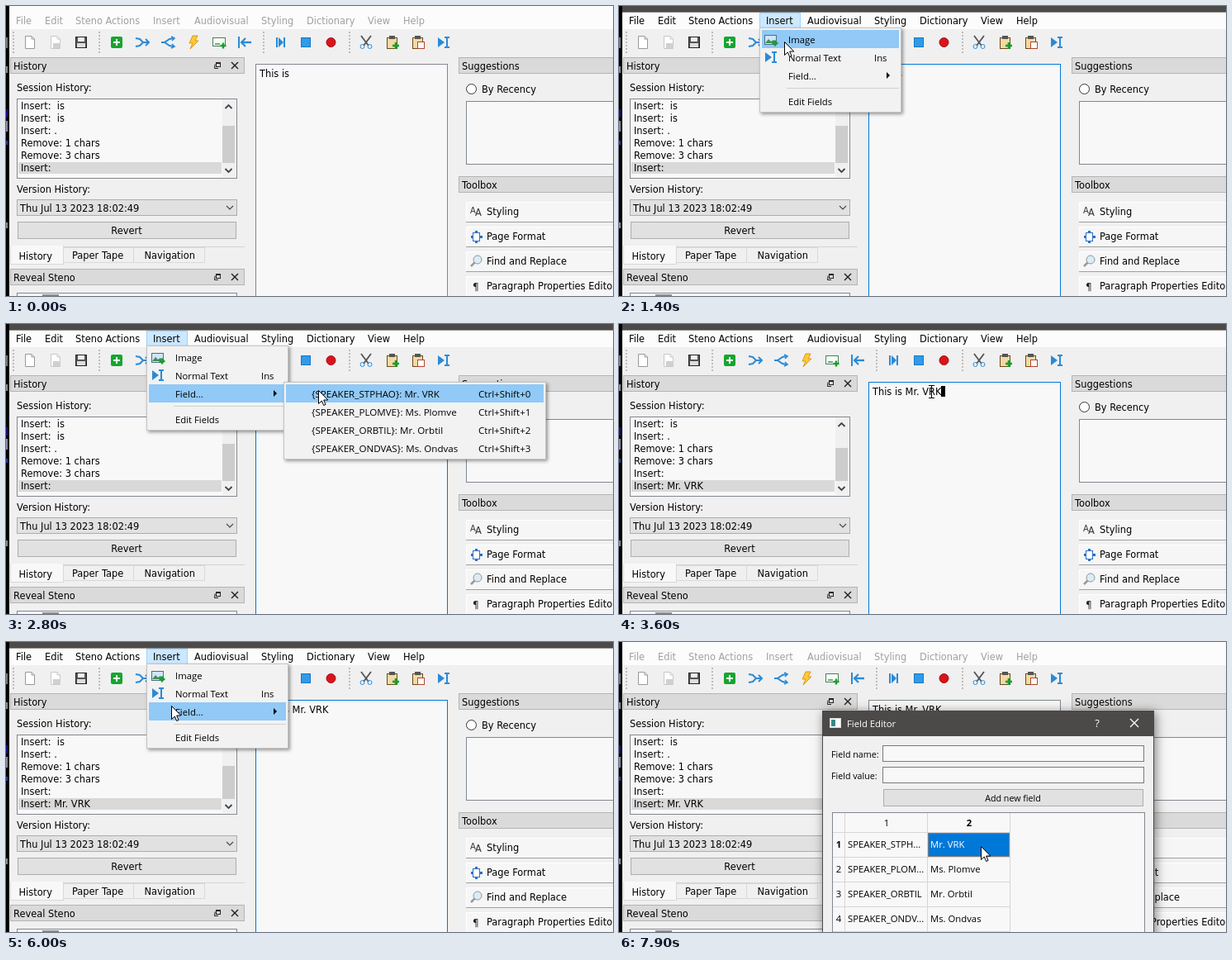
Write an HTML page with a canvas that moves like this. It is 735 by 351 pixels and loops after 8000 ms.

```html
<!DOCTYPE html>
<html lang="en">
<head>
<meta charset="utf-8">
<title>Field editor demo</title>
<style>
html, body { margin: 0; width: 100%; height: 100%; overflow: hidden; background: #f0f0f0; }
canvas { display: block; }
</style>
</head>
<body>
<canvas id="stage" width="735" height="351"></canvas>
<script>
const g = document.getElementById('stage').getContext('2d');
const LOOP = 8000;
const MAIN = '11.4px "DejaVu Sans", sans-serif';
const UI = '11.3px "Open Sans", sans-serif';
const SUB = '11.6px "Open Sans", sans-serif';
const LABEL = '10.7px "Open Sans", sans-serif';
const BLUE = '#0078d7', ICON = '#2b8ad6', PAPER = '#f8f8f8', FACE = '#f0f0f0', HOT = '#91c9f7';

const SPEAKERS = [
  ['STPHAO', 'Mr. VRK'], ['PLOMVE', 'Ms. Plomve'],
  ['ORBTIL', 'Mr. Orbtil'], ['ONDVAS', 'Ms. Ondvas']
];
const MENUS = [['File', 12], ['Edit', 47], ['Steno Actions', 84], ['Insert', 178], ['Audiovisual', 228],
  ['Styling', 309], ['Dictionary', 364], ['View', 438], ['Help', 481], ['', 514]];
const HISTORY = ['Insert:  is', 'Insert:  is', 'Insert: .', 'Remove: 1 chars', 'Remove: 3 chars',
  'Insert: ', 'Insert: ' + SPEAKERS[0][1]];
const ROW = 22;
const ITEMS = [['Image', 29], ['Normal Text', 51], ['Field...', 73], ['Edit Fields', 104]];

// Pointer path: time, x, y
const PATH = [[200, 140, 44], [500, 152, 21], [800, 192, 21], [1300, 192, 21], [1400, 200, 43],
  [1900, 293, 77], [2200, 293, 77], [2800, 378, 80], [3500, 378, 80], [3600, 378, 82],
  [3900, 378, 82], [4000, 408, 64], [4600, 183, 20], [5700, 183, 20], [6200, 212, 115],
  [6600, 212, 115], [7200, 441, 254], [7500, 441, 254], [7600, 438, 247], [LOOP, 438, 247]];

function pointerAt(t) {
  const i = Math.max(1, PATH.findIndex(p => p[0] > t));
  const [a, b] = [PATH[i - 1], PATH[i]];
  const k = Math.max(0, (t - a[0]) / (b[0] - a[0]));
  return [Math.round(a[1] + (b[1] - a[1]) * k), Math.round(a[2] + (b[2] - a[2]) * k)];
}

function rect(x, y, w, h, fill) {
  g.fillStyle = fill;
  g.fillRect(x, y, w, h);
}

function box(x, y, w, h, fill, edge) {
  rect(x, y, w, h, edge);
  rect(x + 1, y + 1, w - 2, h - 2, fill);
}

function text(s, x, y, font = MAIN, color = '#000', align = 'left') {
  g.font = font;
  g.fillStyle = color;
  g.textAlign = align;
  g.fillText(s, x, y);
}

function line(points, color, width = 1) {
  g.strokeStyle = color;
  g.lineWidth = width;
  g.beginPath();
  points.forEach(([x, y]) => g.lineTo(x, y));
  g.stroke();
}

function poly(points, fill, edge) {
  g.beginPath();
  points.forEach(([x, y]) => g.lineTo(x, y));
  g.closePath();
  g.fillStyle = fill;
  g.fill();
  if (edge) {
    g.strokeStyle = edge;
    g.lineWidth = 1;
    g.stroke();
  }
}

function disc(x, y, r, fill, edge) {
  g.beginPath();
  g.arc(x, y, r, 0, 7);
  if (fill) { g.fillStyle = fill; g.fill(); }
  if (edge) { g.strokeStyle = edge; g.lineWidth = 1; g.stroke(); }
}

function at(x, y, draw) {
  g.save();
  g.translate(x, y);
  draw();
  g.restore();
}

function shadowed(draw, blur, offset, alpha) {
  g.save();
  g.shadowColor = `rgba(0,0,0,${alpha})`;
  g.shadowBlur = blur;
  g.shadowOffsetX = g.shadowOffsetY = offset;
  draw();
  g.restore();
}

function plus(x, y, r, color, w) {
  line([[x - r, y], [x + r, y]], color, w);
  line([[x, y - r], [x, y + r]], color, w);
}

function page(edge) {
  poly([[-5.5, -7.5], [2, -7.5], [5.5, -4], [5.5, 7.5], [-5.5, 7.5]], '#fff', edge);
  line([[2, -7], [2, -4], [5, -4]], edge);
}

function clipboard() {
  box(-7, -6, 13, 14, '#f3d9a4', '#6b4a1e');
  rect(-4, -8, 7, 4, '#555');
}

function picture() {
  box(-8, -6, 15, 12, '#cfe6f5', '#4a6f86');
  poly([[-7, 4], [-3, -1], [0, 2], [3, 0], [6, 4]], '#3f8f5a');
  plus(5, 4, 3.5, '#16a02c', 2.4);
}

function textMark() {
  poly([[-7, -6], [1, 0], [-7, 6]], ICON);
  rect(3, -6, 2, 12, ICON);
  rect(1, -7, 6, 2, ICON);
  rect(1, 5, 6, 2, ICON);
}

const TOOLS = [
  [29, () => page('#999')],
  [60, () => { page('#c8c8c8'); rect(-3, 1, 9, 6, '#d0d0d0'); }],
  [91, () => {
    box(-7, -7, 14, 14, '#555', '#222');
    rect(-4, -6, 8, 5, '#eee');
    rect(-5, 1, 10, 5, '#ddd');
  }],
  [134, () => {
    g.fillStyle = '#17a52f';
    g.beginPath();
    g.roundRect(-7, -7, 14, 14, 2);
    g.fill();
    plus(0, 0, 4, '#fff', 2);
  }],
  [165, () => {
    line([[-8, -5], [-3, -4], [1, 0], [-3, 4], [-8, 5]], ICON, 2);
    line([[0, 0], [7, 0]], ICON, 2);
    line([[4, -4], [8, 0], [4, 4]], ICON, 2);
  }],
  [196, () => {
    line([[7, -5], [2, -4], [-4, 0], [2, 4], [7, 5]], ICON, 2);
    line([[-8, 0], [-3, 0]], ICON, 2);
    line([[4, -7], [8, -5], [5, -2]], ICON, 1.6);
    line([[4, 7], [8, 5], [5, 2]], ICON, 1.6);
  }],
  [227, () => poly([[-1, -8], [5, -8], [2, -2], [6, -2], [-4, 8], [-1, 1], [-5, 1]], '#ffc93c', '#d99a12')],
  [258, () => {
    box(-8, -6, 16, 11, '#f4fff4', '#4b7f5a');
    rect(-5, 1, 6, 2, '#7aa886');
    plus(5, 4, 3.5, '#16a02c', 2.4);
  }],
  [289, () => {
    line([[-7, -7], [-7, 7]], ICON, 2);
    line([[-4, 0], [8, 0]], ICON, 2.4);
    line([[1, -5], [-4, 0], [1, 5]], ICON, 2.2);
  }],
  [332, () => {
    rect(-5, -6, 2, 12, ICON);
    poly([[-2, -6], [4, 0], [-2, 6]], ICON);
    rect(4, -6, 2, 12, ICON);
  }],
  [363, () => box(-6, -6, 12, 12, '#2f9bea', '#1d77bd')],
  [393.5, () => disc(0, 0, 5.5, '#d8151c', '#a80f14')],
  [436, () => {
    line([[-6, -8], [3, 4]], '#555', 1.8);
    line([[6, -8], [-3, 4]], '#555', 1.8);
    disc(-4.5, 5, 2.5, null, ICON);
    disc(4.5, 5, 2.5, null, ICON);
  }],
  [468, () => { clipboard(); plus(4, 4, 4, '#16a02c', 2.6); }],
  [499, () => { clipboard(); box(-1, -1, 9, 9, '#fff', '#b4442f'); }],
  [530, textMark]
];

function dock(x, y, w, title) {
  box(x, y, w, 20, '#dadada', '#b4b4b4');
  text(title, x + 4, y + 15);
}

function dockButtons(y) {
  g.strokeStyle = '#222';
  g.lineWidth = 1;
  g.strokeRect(254.5, y - 3.5, 5, 5);
  line([[253, y - 1.5], [252.5, y + 3.5], [257, y + 3.5]], '#222');
  rect(254, y - 4, 6, 2, '#222');
  line([[273, y - 4], [281, y + 4]], '#222', 1.5);
  line([[281, y - 4], [273, y + 4]], '#222', 1.5);
}

function chevron(x, y, d, w) {
  line([[x - 4, y - 2 * d], [x, y + 2 * d], [x + 4, y - 2 * d]], '#444', w);
}

function drawBars(s) {
  rect(4, 0, 731, 28, '#fcfcfc');
  if (s.active) {
    rect(4, 0, 731, 8, '#4c4a48');
    rect(4, 7, 731, 1, '#8a8886');
  }
  const [px, py] = s.pointer;
  MENUS.slice(0, -1).forEach(([name, x], i) => {
    const left = x - 8, right = MENUS[i + 1][1] - 8;
    const open = s.menu && name === 'Insert';
    const hover = s.t >= 200 && !s.menu && !s.dialog && py > 8 && py < 28 && px >= left && px < right;
    if (open || hover) {
      box(left, 8, right - left, 19, open ? '#cce8ff' : '#e5f3ff', open ? '#99d1ff' : '#cce8ff');
    }
    text(name, x, 22, MAIN, s.active ? '#000' : '#a0a0a0');
  });
  [8, 112, 311, 415].forEach(x => {
    for (let y = 31; y < 58; y += 4) rect(x, y, 2, 2, '#bdbdbd');
  });
  TOOLS.forEach(([x, draw]) => at(x, 44, draw));
}

function drawHistory(s) {
  dock(5, 62, 284, 'History');
  dockButtons(72);
  text('Session History:', 13, 103);
  box(13, 112, 267, 97, PAPER, '#828790');
  if (s.t === 6600) rect(15, 114, 246, 14, '#e5f3ff');
  rect(15, 189, 246, 14, '#d9d9d9');
  const first = s.inserted ? 1 : 0;
  HISTORY.slice(first, first + 6).forEach((row, i) => text(row, 18, 125 + 15 * i));
  rect(262, 113, 16, 94, FACE);
  const top = s.inserted ? 150 : 145;
  rect(262, top, 15, 190 - top, '#cdcdcd');
  chevron(269.5, 122, -1, 1.8);
  chevron(269.5, 199, 1, 1.8);

  text('Version History:', 13, 226);
  box(13, 234, 267, 20, '#e1e1e1', '#adadad');
  text('Thu Jul 13 2023 18:02:49', 17, 249);
  chevron(271, 244, 1, 1.1);
  box(14, 261, 265, 21, '#e1e1e1', '#adadad');
  text('Revert', 146, 276, MAIN, '#000', 'center');

  rect(5, 291, 284, 1, '#d4d4d4');
  box(69, 292, 86, 19, FACE, '#d9d9d9');
  box(154, 292, 87, 19, FACE, '#d9d9d9');
  box(5, 290, 65, 23, PAPER, '#d9d9d9');
  rect(6, 290, 63, 2, PAPER);
  text('History', 15.5, 307);
  text('Paper Tape', 80, 306);
  text('Navigation', 167.5, 306);

  dock(5, 318, 284, 'Reveal Steno');
  dockButtons(328);
  box(13, 347, 267, 10, PAPER, '#828790');
  rect(44, 349, 20, 2, '#8c8c8c');
}

function drawEditor(s) {
  box(302, 70, 233, 290, PAPER, s.active ? BLUE : '#828790');
  const words = 'This is ' + (s.inserted ? SPEAKERS[0][1] : '');
  text(words, 307, 86);
  if (s.inserted && s.t < 5400) rect(Math.round(307 + g.measureText(words).width), 75, 5, 13, '#000');
}

const TOOLBOX = [
  ['Styling', () => { text('A', -7, 2, '10px "DejaVu Sans", sans-serif', '#333'); text('A', -1, 5, MAIN, '#333'); }],
  ['Page Format', () => {
    box(-4, -5, 9, 11, '#fff', '#2b6fc6');
    [[0, -6], [0, 6], [-5, 0], [6, 0]].forEach(([x, y]) => rect(x - 1, y - 1, 3, 3, '#2b6fc6'));
  }],
  ['Find and Replace', () => {
    line([[-6, 6], [-1, 1]], '#9a9a9a', 2.5);
    disc(2, -2, 5, '#dcecf6', '#8a98a3');
  }],
  ['Paragraph Properties Editor', () => text('¶', -4, 5, '12px "DejaVu Sans", sans-serif', '#222')]
];

function drawSide() {
  dock(548, 62, 200, 'Suggestions');
  disc(563.5, 100.5, 6, '#fff', '#333');
  text('By Recency', 576, 105);
  box(557, 115, 200, 77, PAPER, '#828790');
  dock(548, 206, 200, 'Toolbox');
  TOOLBOX.forEach(([name, draw], i) => {
    const y = 237 + 30 * i;
    box(557, y, 200, 25, '#f6f6f6', '#fff');
    rect(557, y + 24, 200, 1, '#a0a0a0');
    at(569, y + 12, draw);
    text(name, 582, y + 16);
  });
}

function panel(x, y, w, h) {
  shadowed(() => rect(x, y, w, h, '#c4c4c4'), 4, 2, 0.4);
  box(x, y, w, h, '#f2f2f2', '#c4c4c4');
}

function drawMenu(s) {
  const [px, py] = s.pointer;
  panel(170, 26, 172, 103);
  ITEMS.forEach(([name, y], i) => {
    const hot = s.sub ? i === 2 : py >= y && py < y + ROW;
    if (hot) rect(173, y, 166, ROW, HOT);
    text(name, 205, y + 16, UI);
  });
  at(184, 41, picture);
  at(184, 62, textMark);
  text('Ins', 309, 67, UI);
  poly([[324, 80], [328, 84], [324, 88]], '#000');
  rect(203, 99, 136, 1, '#d0d0d0');

  if (!s.sub) return;
  panel(336, 70, 318, 94);
  if (px > 337) rect(339, 73, 312, ROW, HOT);
  SPEAKERS.forEach(([key, name], i) => {
    const y = 89 + ROW * i;
    text(`{SPEAKER_${key}}: ${name}`, 370, y, SUB);
    text('Ctrl+Shift+' + i, 572, y, SUB);
  });
}

function drawDialog(s) {
  const chosen = s.t >= 7900;
  shadowed(() => rect(246, 83, 402, 300, '#4c4a48'), 12, 2, 0.5);
  rect(247, 114, 400, 240, FACE);
  box(255, 92, 14, 12, '#fff', '#d8d8d8');
  rect(257, 94, 5, 8, '#3a8a86');
  text('Field Editor', 276, 103, UI, '#fff');
  text('?', 579, 103, '13px "Open Sans", sans-serif', '#fff', 'center');
  line([[619, 93], [629, 103]], '#fff', 1.2);
  line([[629, 93], [619, 103]], '#fff', 1.2);

  text('Field name:', 257, 140, LABEL);
  text('Field value:', 257, 166, LABEL);
  box(319, 125, 317, 20, PAPER, chosen ? '#7a7a7a' : BLUE);
  box(319, 151, 317, 20, PAPER, '#7a7a7a');
  if (s.t < 7600) rect(322, 129, 1, 13, '#000');
  box(320, 178, 315, 21, '#e1e1e1', '#adadad');
  text('Add new field', 477, 193, LABEL, '#000', 'center');

  box(258, 206, 379, 160, PAPER, '#828790');
  const grid = '#d6d6d6';
  [273, 373, 473].forEach(x => rect(x, 207, 1, 150, grid));
  for (let y = 230; y < 351; y += 30) rect(259, y, 215, 1, grid);
  const bold = on => (on ? 'bold ' : '') + UI;
  text('1', 324, 223, UI, '#000', 'center');
  text('2', 424, 223, bold(chosen), '#000', 'center');
  SPEAKERS.forEach(([key, name], i) => {
    const y = 249 + 30 * i;
    const on = chosen && i === 0;
    text(i + 1, 266, y, bold(on), '#000', 'center');
    text('SPEAKER_' + (i === 2 ? key : key.slice(0, 4) + '...'), 277, y, UI);
    if (on) {
      rect(374, 231, 99, 29, BLUE);
      g.setLineDash([1, 1]);
      g.strokeStyle = '#ff8728';
      g.lineWidth = 1;
      g.strokeRect(374.5, 231.5, 98, 28);
      g.setLineDash([]);
    }
    text(name, 377, y, UI, on ? '#fff' : '#000');
  });
}

function drawPointer(s) {
  if (s.t < 200) return;
  at(...s.pointer, () => {
    if (s.t >= 3600 && s.t < 4000) {
      line([[-3, -7.5], [4, -7.5]], '#000');
      line([[-3, 7.5], [4, 7.5]], '#000');
      line([[0.5, -7], [0.5, 7]], '#000');
    } else {
      poly([[0.5, 0.5], [0.5, 16.5], [4.3, 13], [6.7, 18.5], [9, 17.5], [6.7, 12], [11.8, 12]], '#fff', '#000');
    }
  });
}

function drawDesktop() {
  rect(0, 0, 4, 351, '#000');
  [[38, 13, '#777'], [73, 8, '#888'], [125, 10, '#101080'], [139, 13, '#8888a0'], [163, 5, '#2038a0'], [262, 7, '#888']]
    .forEach(([y, h, color]) => rect(0, y, 2, h, color));
}

function draw(ms) {
  const t = Math.floor(ms / 100) * 100;
  const s = {
    t,
    pointer: pointerAt(t),
    active: t >= 1000 && t < 6600,
    menu: (t >= 1000 && t < 3600) || (t >= 5400 && t < 6600),
    sub: t >= 2000 && t < 3600,
    inserted: t >= 3600,
    dialog: t >= 6600
  };
  rect(0, 0, 735, 351, FACE);
  drawDesktop();
  drawBars(s);
  drawHistory(s);
  drawEditor(s);
  drawSide();
  if (s.menu) drawMenu(s);
  if (s.dialog) drawDialog(s);
  drawPointer(s);
}

const start = performance.now();
function tick() {
  draw((performance.now() - start) % LOOP);
  requestAnimationFrame(tick);
}
tick();
</script>
</body>
</html>
```
